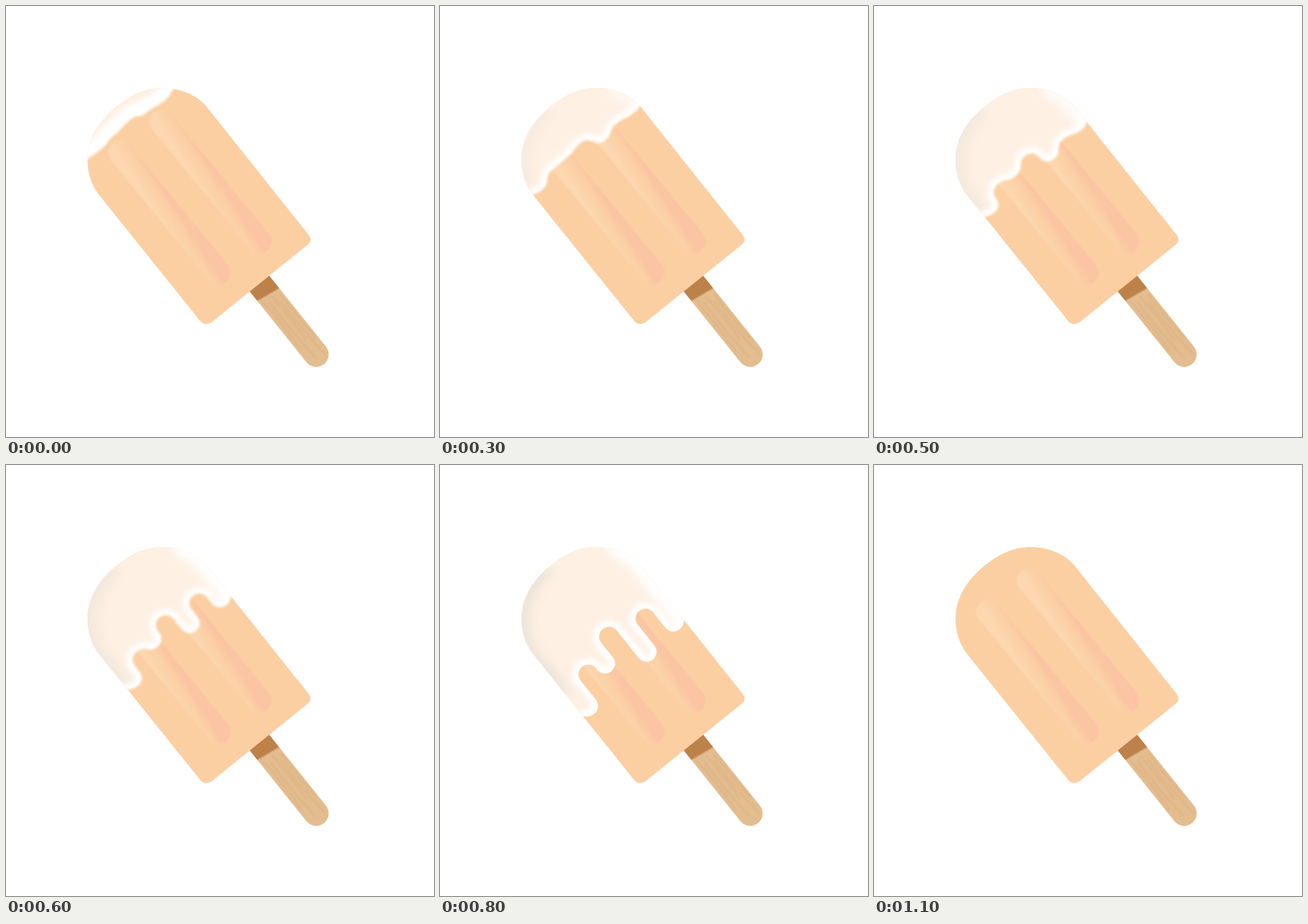
An HTML page for the animation above (8 s loop, 745 px wide and 751 px high).

```html
<!DOCTYPE html>
<html>
<head>
<meta charset="utf-8">
<title>Ice lolly</title>
<style>
html, body { margin: 0; width: 100%; height: 100%; overflow: hidden; background: #fff; }
svg { display: block; }
</style>
</head>
<body>
<svg width="745" height="751" viewBox="0 0 745 751">
  <defs>
    <path id="body" d="M161 328C148 310 142 290 142 268C142 229 165 196 197 172C220 154 245 143 272 143C303 143 330 154 348 174L527 399Q534 409 525 416L358 551Q348 558 339 550Z"/>
    <clipPath id="bodyClip"><use href="#body"/></clipPath>
    <clipPath id="creamClip"><path id="cream" transform="rotate(-38.67)"/></clipPath>
    <rect id="stick" x="20.5" y="630" width="43.5" height="203" rx="21.7"/>
    <clipPath id="stickClip"><use href="#stick"/></clipPath>
    <linearGradient id="ridge" gradientUnits="userSpaceOnUse" x1="-21" y1="135" x2="20.4" y2="140">
      <stop offset="0" stop-color="#fcd7b0"/>
      <stop offset=".5" stop-color="#fbd0a5"/>
      <stop offset=".85" stop-color="#fbc4a2"/>
      <stop offset="1" stop-color="#fbc5a4"/>
    </linearGradient>
    <rect id="groove" x="-21" y="-21" width="42" height="312" rx="21" fill="url(#ridge)" filter="url(#b1)"/>
    <g color-interpolation-filters="sRGB">
      <filter id="b1" filterUnits="userSpaceOnUse" x="-400" y="-50" width="1200" height="1050"><feGaussianBlur stdDeviation="1"/></filter>
      <filter id="b5" filterUnits="userSpaceOnUse" x="-400" y="-50" width="1200" height="1050"><feGaussianBlur stdDeviation="5"/></filter>
      <filter id="b9" filterUnits="userSpaceOnUse" x="-400" y="-50" width="1200" height="1050"><feGaussianBlur stdDeviation="9"/></filter>
      <filter id="soft" filterUnits="userSpaceOnUse" x="-400" y="-50" width="1200" height="1050"><feGaussianBlur id="softness"/></filter>
    </g>
  </defs>

  <g transform="rotate(-38.67)">
    <use href="#stick" fill="#e3bd8f"/>
    <g clip-path="url(#stickClip)">
      <path d="M27 680Q31 730 26 790M36 690Q33 740 38 815M45 685Q48 750 44 780M52 700Q49 760 55 822M59 690Q57 730 60 790" fill="none" stroke="#dbb081" stroke-width="3" opacity=".55" filter="url(#b1)"/>
      <path d="M10 630H74V682.5L10 673Z" fill="#bd814a" filter="url(#b1)"/>
    </g>
  </g>

  <use href="#body" fill="#fbcfa2"/>
  <g transform="rotate(-38.67)">
    <use href="#groove" transform="translate(-4.6 324) rotate(-.8)"/>
    <use href="#groove" transform="translate(84.8 326) rotate(-.8)"/>
  </g>

  <g id="coat" clip-path="url(#bodyClip)">
    <g filter="url(#soft)">
      <g clip-path="url(#creamClip)" fill="none">
        <rect width="745" height="751" fill="#fef0e3"/>
        <path id="shade" d="M185 175Q112 250 156 332L215 402" stroke="#e9e2d8" stroke-width="34" filter="url(#b9)"/>
        <path id="shine" d="M296 136Q328 144 350 170L470 322" stroke="#fff" stroke-width="42" filter="url(#b9)"/>
        <path id="edge" transform="rotate(-38.67)" stroke="#fff" filter="url(#b5)"/>
      </g>
    </g>
  </g>
</svg>
<script>
const $ = id => document.getElementById(id);
const set = (id, name, value) => $(id).setAttribute(name, value);

// Depth of drips and notches, left to right, at the given steps
const steps = [0, 3, 5, 6, 8, 10];
const depths = [
  [297, 361, 412, 444, 506, 547],
  [298, 345, 377, 396, 429, 461],
  [293, 344, 385, 412, 467, 503],
  [290, 339, 368, 374, 400, 427],
  [298, 362, 404, 432, 496, 539],
  [301, 352, 387, 381, 415, 446],
  [294, 356, 394, 430, 484, 523]
];
const first = -61, gap = 34.6, r = gap / 2;

function depthAt(row, s) {
  let i = 0;
  while (i < steps.length - 2 && s > steps[i + 1]) i++;
  const k = (s - steps[i]) / (steps[i + 1] - steps[i]);
  return row[i] + (row[i + 1] - row[i]) * k;
}

function dripEdge(s) {
  const y = depths.map(row => depthAt(row, s));
  const drop = 9 * Math.min(1, s / 8);
  let d = `M-100 ${y[0] - drop}H-79Q-72 ${y[0]} ${first} ${y[0]}`;
  for (let i = 1; i < y.length; i++) {
    const a = y[i - 1], b = y[i], x = first + gap * i, mid = x - r;
    if (Math.abs(b - a) < 30) {
      d += `C${x - 14} ${a} ${x - 20} ${b} ${x} ${b}`;
    } else {
      const ry = Math.min(r, Math.abs(b - a) / 2), dir = Math.sign(b - a);
      const sweep = dir > 0 ? 1 : 0;
      d += `A${r} ${ry} 0 0 ${sweep} ${mid} ${a + dir * ry}V${b - dir * ry}`
         + `A${r} ${ry} 0 0 ${1 - sweep} ${x} ${b}`;
    }
  }
  return d + `Q157 ${y[6]} 163 ${y[6] - drop}H190`;
}

function draw(s) {
  $("coat").style.display = s <= 10 ? "" : "none";
  if (s > 10) return;
  const d = dripEdge(s);
  set("edge", "d", d);
  set("cream", "d", d + "V150H-100Z");
  set("edge", "stroke-width", 22 + 24 * Math.max(0, 1 - s / 3));
  set("shine", "opacity", Math.min(1, s / 6));
  set("shade", "opacity", s / 10);
  set("softness", "stdDeviation", s < 7 ? 2.2 : s < 8 ? 1 : 0.01);
}

function tick() {
  draw(Math.floor(performance.now() % 8000 / 100));
  requestAnimationFrame(tick);
}
tick();
</script>
</body>
</html>
```
